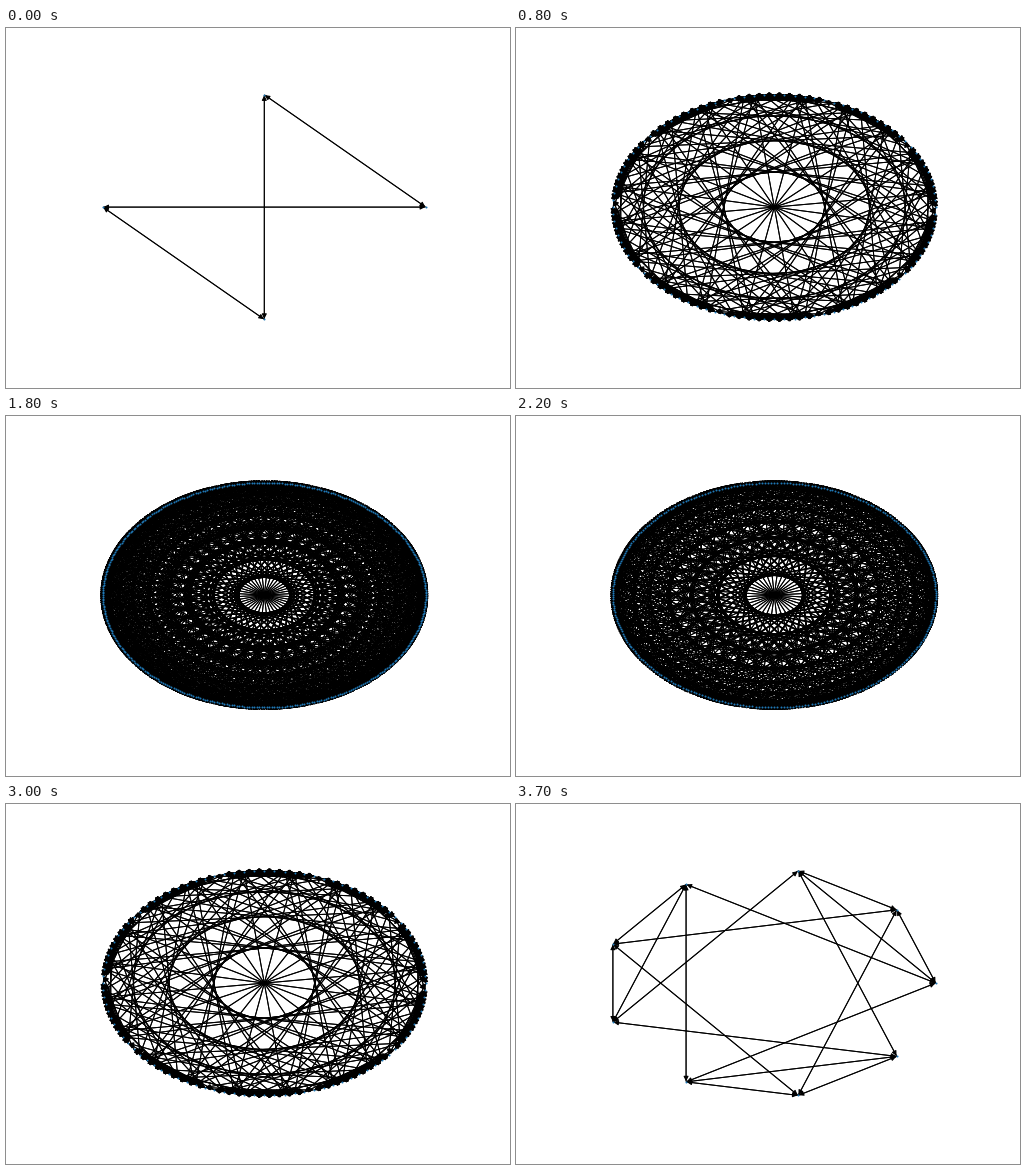
Animation of 504 by 360 pixels, one loop 3.8 s. Source, as a matplotlib script:

```python
import numpy as np
import matplotlib.pyplot as plt
from itertools import permutations, product
from matplotlib.animation import FuncAnimation
from matplotlib.collections import LineCollection, PolyCollection

W, H = 504, 360
FRAMES, INTERVAL = 38, 100
CENTER = np.array([0.5125 * W, 0.5025 * H])
HALF = np.array([0.775 * W, 0.755 * H]) / 2
PADDING = 1.1 * 1.1
SHRINK = 0.5
HEAD_LENGTH, HEAD_WIDTH = 4, 2
TIP_INSET = 0.5 * np.hypot(HEAD_LENGTH, HEAD_WIDTH) / HEAD_WIDTH
GLOBAL_LINKS = 2

fig = plt.figure(figsize=(W / 72, H / 72), dpi=72, facecolor="white")
ax = fig.add_axes([0, 0, 1, 1])
ax.set(xlim=(0, W), ylim=(0, H))
ax.axis("off")

shafts = LineCollection([], colors="black", linewidths=1, capstyle="round", zorder=1)
shafts.set_snap(False)
heads = PolyCollection([], facecolors="black", edgecolors="black", linewidths=1,
                       joinstyle="round", zorder=1)
ax.add_collection(shafts, autolim=False)
ax.add_collection(heads, autolim=False)
nodes = ax.scatter([], [], s=1, c="#1f77b4", linewidths=1, zorder=2)


def layout(count):
    """Nodes on a circle, fitted to the plot area in pixels."""
    angle = 2 * np.pi * np.arange(count) / count
    pos = np.column_stack([np.cos(angle), np.sin(angle)])
    low, high = pos.min(axis=0), pos.max(axis=0)
    return CENTER + HALF * (pos - (low + high) / 2) / ((high - low) / 2 * PADDING)


def dragonfly_edges(n):
    """n cliques of n routers; each router also links to a few other groups."""
    edges = {(g * n + a, g * n + b)
             for g in range(n) for a, b in permutations(range(n), 2)}
    for group, router, port in product(range(n), range(n), range(GLOBAL_LINKS)):
        other = (group + router * GLOBAL_LINKS + port) % n
        if other != group:
            a, b = group * n + router, other * n + router
            edges |= {(a, b), (b, a)}
    return np.array(sorted(edges))


def update(frame):
    n = 2 + min(frame, FRAMES - frame)
    pos = layout(n * n)
    source, target = pos[dragonfly_edges(n).T]
    along = target - source
    along /= np.linalg.norm(along, axis=1, keepdims=True)
    across = along[:, ::-1] * [-1, 1]

    start = source + SHRINK * along
    tip = target - (SHRINK + TIP_INSET) * along
    base = tip - HEAD_LENGTH * along
    side = HEAD_WIDTH * across

    shafts.set_segments(np.stack([start, tip], axis=1))
    heads.set_verts(np.stack([base + side, tip, base - side], axis=1))
    nodes.set_offsets(pos)
    return shafts, heads, nodes


anim = FuncAnimation(fig, update, frames=FRAMES, interval=INTERVAL,
                     init_func=lambda: update(0), repeat=True, repeat_delay=0)
plt.show()
```
